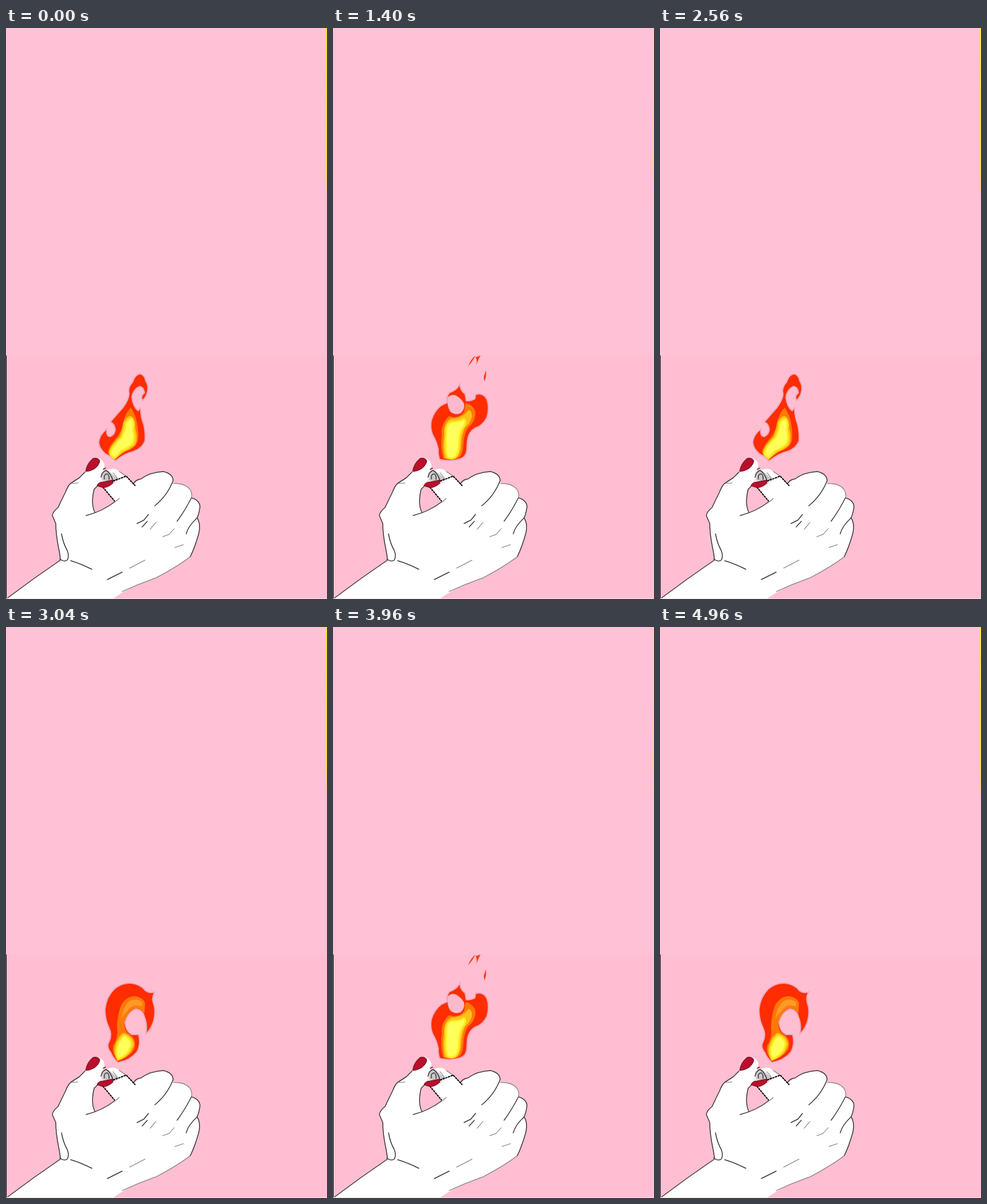
An HTML page without scripts that plays this animation: 561 by 999 pixels, repeating every 5000 ms.

```html
<!DOCTYPE html>
<html lang="en">
<head>
<meta charset="utf-8">
<title>Lighter</title>
<style>
  html, body { margin: 0; width: 100%; height: 100%; overflow: hidden; background: #ffc1d5; }
  svg { display: block; width: 561px; height: 999px; }
  .pose { visibility: hidden; }
  .red { fill: #ff2d00; stroke: #d78ba2; stroke-opacity: .4; stroke-width: 4; paint-order: stroke; }
  .orange { fill: #ff7a05; }
  .gold { fill: #ffc01a; }
  .yellow { fill: #ffff5a; stroke: #ffec20; stroke-width: 3; }
  .hole { fill: #fbbacb; stroke: #e58a94; stroke-opacity: .5; }
  .skin { fill: #fff; }
  .line { fill: none; stroke: #3a3638; stroke-width: 1.5; stroke-linecap: round; stroke-linejoin: round; }
  .faint { stroke: #7c7478; stroke-width: 1.1; }
  .case { fill: none; stroke: #000; stroke-width: 2; stroke-dasharray: 4 1; }
  .nail { fill: #b90f2b; stroke: #5c1020; stroke-width: 1; }
</style>
</head>
<body>
<svg viewBox="0 0 561 999">
  <defs>
    <clipPath id="panel"><rect y="573" width="561" height="426"/></clipPath>
    <linearGradient id="edge" x2="0" y2="1">
      <stop offset="0" stop-color="#ffe23c"/>
      <stop offset=".8" stop-color="#ffdc50"/>
      <stop offset="1" stop-color="#ffc1d5"/>
    </linearGradient>
  </defs>

  <rect width="561" height="573" fill="#ffc1d5"/>
  <rect y="573" width="561" height="426" fill="#ffbed2"/>
  <rect x="559" width="2" height="300" fill="url(#edge)"/>
  <rect y="573" width="1" height="425" fill="#000"/>

  <!-- restarts the flicker every five seconds -->
  <set id="loop" attributeName="class" to="lit" begin="0s;loop.end" dur="5s"/>

  <g clip-path="url(#panel)">
  <g transform="translate(0 757)">
  <g>
    <animateTransform attributeName="transform" type="scale" calcMode="discrete" dur=".64s" begin="0s;loop.end" repeatCount="indefinite"
      values="1 1;1 1.05;1 .95;1 1;1 1.05;1 .97;1 1.03;1 .97;1 1.03;1 .97;1 1.03;1 .95;1 1;1 1.05;1 .97;1 1.03"/>
    <g transform="translate(0 -757)">

      <!-- tall with a hooked tip -->
      <g class="pose">
        <animate attributeName="visibility" values="visible;hidden" keyTimes="0;.125" calcMode="discrete" dur=".64s" begin="0s;loop.end" repeatCount="indefinite"/>
        <path class="red" d="M191 756Q184 749 174 744Q163 734 163 724Q165 712 175 704Q174 715 182 716Q191 712 192 703Q191 692 184 689Q196 675 205 665Q216 650 216 640Q213 630 222 620Q227 606 235 606Q242 609 243 617Q249 627 246 637Q244 645 239 650Q236 643 243 639Q242 627 233 626Q221 632 219 646Q221 664 231 671L234 667Q235 682 240 695Q243 710 242 722Q237 735 222 740Q208 743 191 756Z"/>
        <path class="orange" d="M190 754Q176 746 179 738Q183 728 193 717Q202 706 204 692Q208 674 218 664Q227 678 229 691Q233 711 230 724Q225 736 210 740Z"/>
        <path class="gold" d="M190 755Q177 747 180 740Q185 728 198 715Q204 702 205 690Q212 677 219 679Q227 685 226 700Q231 717 226 729Q217 738 205 742Z"/>
        <path class="yellow" d="M190 752Q180 748 184 738Q189 729 202 716Q209 703 209 692Q215 682 220 684Q224 691 222 703Q226 718 221 728Q211 736 201 740Z"/>
      </g>

      <!-- broad, the tip torn away -->
      <g class="pose">
        <animate attributeName="visibility" values="hidden;visible;hidden" keyTimes="0;.125;.3125" calcMode="discrete" dur=".64s" begin="0s;loop.end" repeatCount="indefinite"/>
        <path class="red" d="M187 754Q184 745 185 737Q182 723 176 713Q170 701 173 686Q178 670 190 661L201 656Q198 647 204 639Q217 634 221 626Q222 635 230 641L232 653Q243 654 249 649L250 642Q262 639 268 650Q273 665 268 681Q261 695 248 699Q236 706 234 721L233 736Q233 749 222 753Q205 758 187 754Z"/>
        <path fill="#ff3b10" d="M236 592Q241 579 249 573Q245 581 241 586ZM249 576L258 573Q254 579 250 591Q253 581 249 576ZM267 599Q269 608 265 618Q262 611 265 606Z"/>
        <path class="orange" d="M193 753Q187 735 190 712Q188 692 203 679Q219 685 229 672L232 656Q246 660 249 672Q249 689 237 698Q229 709 228 728Q227 748 219 752Q207 758 193 753Z"/>
        <path class="gold" d="M195 752Q191 733 194 711Q193 691 206 683Q225 684 237 668Q245 671 242 683Q240 691 231 699Q225 711 224 730Q223 749 213 754Q203 756 195 752Z"/>
        <path class="yellow" d="M200 751Q195 734 198 712Q196 693 208 689Q222 689 229 684Q235 690 226 700Q220 712 220 730Q220 747 211 752Q205 754 200 751Z"/>
        <path class="hole" d="M200 647Q206 640 215 643Q225 649 229 657Q231 667 223 674Q213 678 205 671Q199 662 200 647Z"/>
      </g>

      <!-- split crown -->
      <g class="pose">
        <animate attributeName="visibility" values="hidden;visible;hidden" keyTimes="0;.3125;.4375" calcMode="discrete" dur=".64s" begin="0s;loop.end" repeatCount="indefinite"/>
        <path class="red" d="M190 756Q183 745 181 732Q170 714 171 696Q172 676 187 660Q200 645 202 628Q213 641 211 655Q217 667 231 661Q247 649 246 628Q263 642 263 662Q261 684 248 699Q237 712 237 728Q235 748 220 753Z"/>
        <path class="red" d="M249 616Q263 606 258 591Q269 607 257 620Z"/>
        <path class="orange" d="M193 754Q184 733 186 710Q187 690 202 676Q218 685 231 677L243 664Q249 683 238 699Q228 714 229 731Q227 748 214 754Z"/>
        <path class="gold" d="M195 754Q188 734 192 713Q193 697 205 688Q220 691 233 683Q236 693 227 704Q223 716 224 732Q222 749 210 754Z"/>
        <path class="yellow" d="M199 752Q193 735 197 715Q199 701 209 696Q218 697 224 694Q225 703 219 714Q219 734 217 743Q210 755 199 752Z"/>
      </g>

      <!-- single leaning tongue -->
      <g class="pose">
        <animate attributeName="visibility" values="hidden;visible;hidden" keyTimes="0;.4375;.5625" calcMode="discrete" dur=".64s" begin="0s;loop.end" repeatCount="indefinite"/>
        <path class="red" d="M192 757Q180 746 177 730Q169 711 172 690Q177 669 194 654Q211 640 218 616Q227 631 225 646Q244 651 251 667Q255 684 246 701Q238 715 237 732Q230 750 212 755Z"/>
        <path class="orange" d="M194 756Q182 735 185 711Q188 690 205 676Q218 670 222 658Q239 670 238 686Q235 700 229 714Q230 739 220 747Z"/>
        <path class="gold" d="M195 755Q186 737 191 716Q195 700 209 692Q219 686 224 678Q232 691 224 707Q224 740 213 750Z"/>
        <path class="yellow" d="M197 754Q190 739 196 719Q201 707 212 702L220 697Q223 706 219 716Q222 740 210 750Z"/>
      </g>

      <!-- notch opening on the right -->
      <g class="pose">
        <animate attributeName="visibility" values="hidden;visible;hidden" keyTimes="0;.5625;.6875" calcMode="discrete" dur=".64s" begin="0s;loop.end" repeatCount="indefinite"/>
        <path class="red" d="M194 759Q182 748 179 733Q180 716 175 701Q170 678 179 659Q192 641 211 634Q224 633 234 622Q235 635 243 645Q258 662 253 688Q250 704 243 714Q244 698 233 692Q221 694 220 707Q223 717 232 720Q234 737 224 748Q212 757 194 759Z"/>
        <path class="orange" d="M194 757Q183 739 189 717Q188 694 198 674Q209 659 226 657Q240 664 241 684Q232 688 221 694Q212 706 223 718Q227 737 216 748Z"/>
        <path class="gold" d="M195 756Q187 740 193 720Q195 700 205 687Q213 680 222 683Q210 697 217 716Q225 735 214 747Z"/>
        <path class="yellow" d="M196 754Q190 741 196 724Q200 708 207 702Q207 714 216 721Q221 736 212 747Z"/>
      </g>

      <!-- curled -->
      <g class="pose">
        <animate attributeName="visibility" values="hidden;visible;hidden" keyTimes="0;.6875;.875" calcMode="discrete" dur=".64s" begin="0s;loop.end" repeatCount="indefinite"/>
        <path class="red" d="M196 761Q188 754 184 744Q176 734 181 726Q187 713 181 701Q174 687 174 669Q176 648 190 634Q203 623 218 624Q235 626 243 637Q250 642 258 640Q254 648 256 656Q262 672 257 689Q253 702 246 709Q248 694 243 682Q240 669 227 667Q213 672 207 691Q208 708 220 714L231 714Q235 730 228 743Q217 757 196 761Z"/>
        <path class="orange" d="M195 759Q185 746 187 733Q197 718 194 700Q195 676 202 660Q212 645 227 646Q240 649 243 658L242 676Q235 667 226 667Q214 671 207 691Q205 707 218 714Q229 723 224 739Q215 753 195 759Z"/>
        <path fill="#ff982a" d="M202 685Q204 664 217 654Q229 649 237 656Q240 662 236 664Q222 658 213 671Q207 677 202 685Z"/>
        <path class="gold" d="M195 759Q187 746 190 733Q196 715 205 710Q222 715 224 730Q219 751 195 759Z"/>
        <path class="yellow" d="M196 756Q191 745 194 734Q200 718 207 715Q219 720 219 731Q215 748 196 756Z"/>
      </g>

      <!-- curl stretching upward -->
      <g class="pose">
        <animate attributeName="visibility" values="hidden;visible" keyTimes="0;.875" calcMode="discrete" dur=".64s" begin="0s;loop.end" repeatCount="indefinite"/>
        <path class="red" d="M194 758Q184 750 177 742Q168 730 173 720Q184 714 184 703Q178 691 183 679Q194 664 196 648Q201 627 217 617Q232 611 245 619Q254 632 255 648Q254 665 245 678Q245 664 241 654Q233 646 224 654Q215 668 219 682Q224 691 234 691Q239 708 238 722Q232 742 215 748Z"/>
        <path class="orange" d="M193 757Q180 745 184 733Q196 717 198 699Q200 673 211 654Q222 637 237 642Q220 647 214 667Q214 684 224 693Q233 714 226 732Q215 747 193 757Z"/>
        <path class="gold" d="M193 757Q182 746 187 734Q200 718 203 704Q207 693 212 689Q224 697 227 721Q219 744 193 757Z"/>
        <path class="yellow" d="M194 754Q186 746 191 735Q203 720 207 706L212 699Q221 708 222 722Q214 743 194 754Z"/>
      </g>
    </g>
  </g>
  </g>
  </g>

  <!-- hand -->
  <path class="skin" d="M3 998Q48 963 95 932Q95 924 92 910Q87 885 87 867L81 853Q82 846 91 839Q97 826 104 812Q109 799 114 796L128 787L138 777Q142 756 160 752Q170 755 172 764Q172 773 166 779Q168 793 160 801L154 807Q148 832 155 847Q172 842 190 829L220 800L232 791Q252 777 275 776Q292 780 292 796Q313 796 322 808Q326 815 324 822Q338 826 339 837Q338 848 334 857Q341 868 337 884Q330 909 322 925Q300 942 262 962Q215 978 188 998Z"/>
  <g class="line">
    <path d="M3 997Q48 963 95 931Q95 924 92 910Q87 885 87 867L81 853Q82 846 91 839Q97 826 104 812Q109 799 114 796L128 787L138 777"/>
    <path d="M160 801L154 807Q148 832 155 847M140 853Q168 846 190 829"/>
    <path d="M222 800Q225 790 236 789Q252 777 275 776Q292 780 292 792Q282 818 260 836"/>
    <path d="M324 822Q313 844 299 863M324 822Q338 826 339 837Q338 848 334 857Q318 872 315 885"/>
    <path d="M334 857Q341 868 337 884Q330 909 322 925"/>
    <path d="M97 885Q100 902 107 914Q111 924 107 931Q102 935 94 929M113 932Q130 937 150 947M177 965L203 952"/>
    <path d="M229 867L241 861L249 851M238 873L247 863"/>
  </g>
  <g class="line faint">
    <path d="M292 797Q313 796 322 808Q326 815 324 822M322 925Q300 942 262 962Q233 972 203 986"/>
    <path d="M216 945L243 931M252 877L262 865M274 890L285 886L294 876M295 909L310 904M113 797L126 796"/>
  </g>
  <path class="nail" d="M139 776Q141 762 152 753Q161 751 164 757Q163 765 155 771Q147 776 139 776Z"/>

  <!-- lighter -->
  <path class="skin" d="M169 775L181 772Q190 769 198 776L211 785L178 800L166 794Z"/>
  <path fill="#c9c7c8" d="M168 778Q176 770 184 779L195 788L187 793L168 792Z"/>
  <path class="line" d="M166 786Q168 776 175 774Q183 779 187 792M172 789Q170 781 177 780Q181 783 180 790M170 772L174 770"/>
  <path class="line faint" d="M187 778L195 788L188 792M198 776L210 784"/>
  <path class="skin" d="M172 807L210 784L226 803L191 829Z"/>
  <path class="case" d="M169 803L190 828M187 793L210 784L226 801"/>
  <path class="line faint" d="M191 829L198 823"/>
  <path class="nail" d="M159 801Q160 795 170 794L186 791L187 796Q179 804 169 804Z"/>

  <rect y="998" width="561" height="1" fill="#ffdfe9"/>
</svg>
</body>
</html>
```
